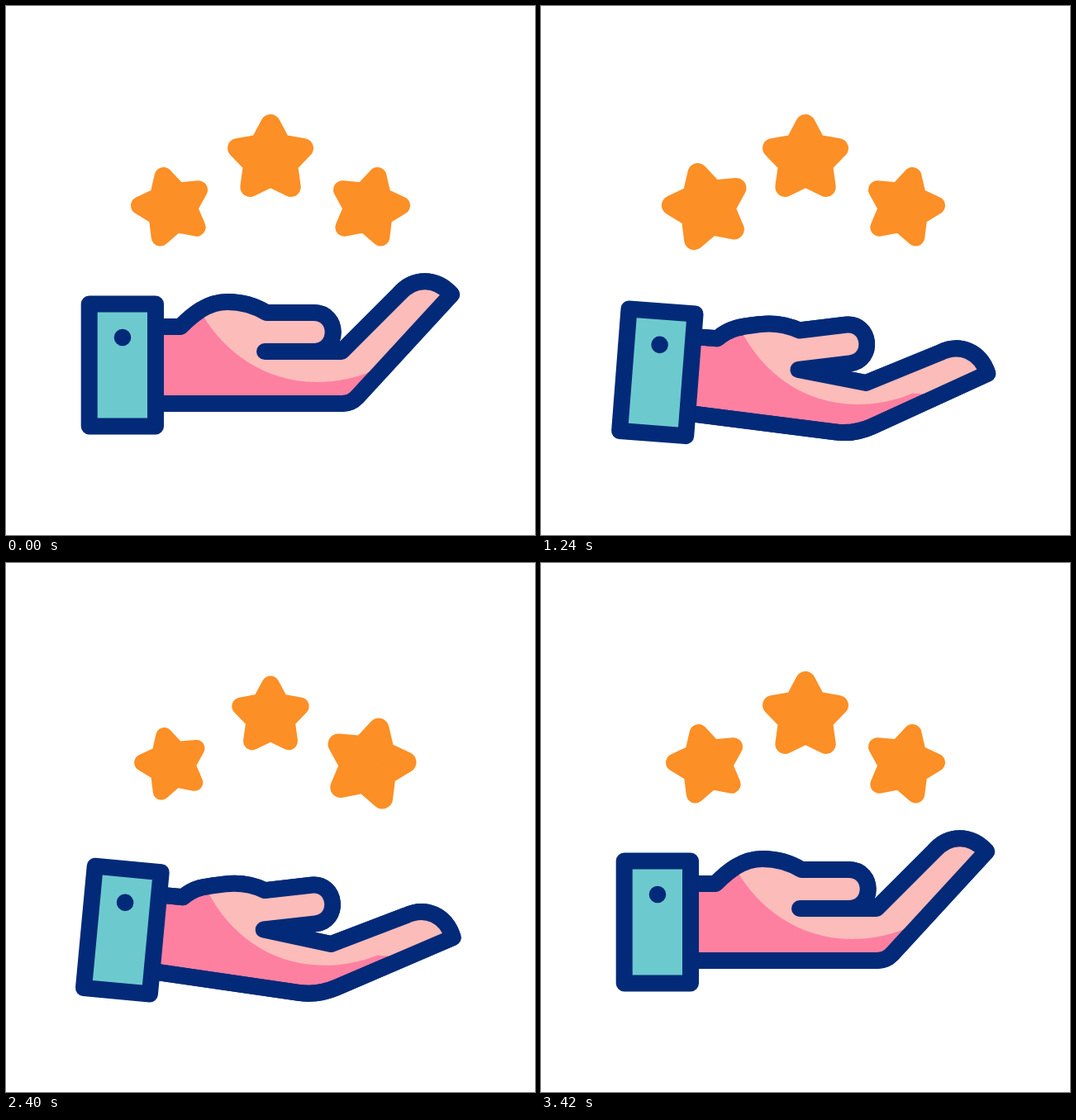
Recreate the animation shown at these times as an HTML page with a canvas. Size 640 by 640 pixels, loop 3600 ms.

```html
<!DOCTYPE html>
<html lang="en">
<head>
<meta charset="utf-8">
<title>Hand and stars</title>
<style>
html, body { margin: 0; width: 100%; height: 100%; overflow: hidden; background: #fff; }
canvas { display: block; width: 640px; height: 640px; }
</style>
</head>
<body>
<canvas id="stage" width="640" height="640"></canvas>
<script>
const ctx = document.getElementById('stage').getContext('2d');
const LOOP = 3600;
const NAVY = '#032a78', TEAL = '#6ccacf', PINK = '#fd80a1', SKIN = '#fbbcba', ORANGE = '#fc8f25';

// Joints, in the upright frame of the arm.
const CUFF = [141, 434.5], KNUCKLE = [372, 396], THUMB = [311, 394];

// Angles are in degrees; bend opens the fingers and reach foreshortens the hand.
const rest = { drop: 0, bend: 0, thumb: 0, reach: 1 };
const low = { drop: 11.5, bend: 20, thumb: -13, reach: .99 };
const high = { drop: -1.6, bend: 14, thumb: -4, reach: .968 };
const poses = [[200, rest], [1000, low], [1800, high], [2600, low], [3400, rest]];
const tilts = [[200, 0], [1000, 7.5], [1800, -7.4], [2600, 7.5], [3000, -8], [3400, 0]];

const rad = deg => deg * Math.PI / 180;
const mix = (a, b, k) => a + (b - a) * k;

// Finds the two keys around t and the sine-eased progress between them.
function span(keys, t) {
  const next = keys.findIndex(key => key[0] > t);
  if (next < 1) {
    const end = keys.at(next)[1];
    return [end, end, 0];
  }
  const [t0, a] = keys[next - 1], [t1, b] = keys[next];
  return [a, b, (1 - Math.cos(Math.PI * (t - t0) / (t1 - t0))) / 2];
}

// Returns a function that turns points about a pivot.
function turner([px, py], deg) {
  const c = Math.cos(rad(deg)), s = Math.sin(rad(deg));
  return (x, y) => [px + (x - px) * c - (y - py) * s, py + (x - px) * s + (y - py) * c];
}

function handPath(bend, thumb) {
  const f = turner(KNUCKLE, bend), t = turner(THUMB, thumb);
  const p = new Path2D();
  p.moveTo(183, 388);
  p.lineTo(211, 388);
  p.bezierCurveTo(225, 374, ...t(243, 358), ...t(268, 358));
  p.bezierCurveTo(...t(285, 358), ...t(300, 362), ...t(315, 371));
  p.lineTo(...t(372, 371));
  p.bezierCurveTo(...t(403.5, 371), ...t(403.5, 418), ...t(372, 418));
  p.lineTo(313, 418);
  p.lineTo(...f(406, 418));
  p.lineTo(...f(475, 349));
  p.bezierCurveTo(...f(493, 328), ...f(520, 328), ...f(539, 349));
  // The heel of the hand grows rounder as the fingers open.
  p.arcTo(...f(417.5, 481), 183, 481, 25 + bend * 3.2);
  p.lineTo(183, 481);
  return p;
}

const light = new Path2D(
  'M238 374C262 415 310 455 376 455C400 455 428 450 455 436H600V200H238Z');
const cuff = new Path2D('M100.7 360.5H181V508.5H100.7Z');
const star = new Path2D();
for (let i = 0; i < 10; i++) {
  const r = i % 2 ? 22 : 42, a = rad(i * 36);
  star.lineTo(r * Math.sin(a), -r * Math.cos(a));
}
star.closePath();

function paint(path, fill, stroke, width) {
  ctx.fillStyle = fill;
  ctx.strokeStyle = stroke;
  ctx.lineWidth = width;
  ctx.fill(path);
  ctx.stroke(path);
}

// All stars dip together, then swell one after another from left to right.
function pulse(i, t) {
  return mix(...span([
    [200, 1], [600, .865], [1000, 1], [1000 + 320 * i, 1],
    [1460 + 410 * i, 1.19], [2260 + 270 * i, .87], [2600 + 400 * i, 1]
  ], t));
}

function drawStar(i, t) {
  const side = i - 1;
  const k = pulse(i, t) * (side ? .92 : 1);
  ctx.save();
  ctx.translate(320 + side * 119.4, side ? 243.4 : 185);
  ctx.rotate(rad(side * 15));
  ctx.scale(k, k);
  paint(star, ORANGE, ORANGE, 24);
  ctx.restore();
}

function drawArm(t) {
  const [a, b, k] = span(poses, t);
  const at = name => mix(a[name], b[name], k);
  const [cx, cy] = CUFF;
  const hand = handPath(at('bend'), at('thumb'));

  ctx.save();
  ctx.translate(cx, cy + at('drop'));
  ctx.rotate(rad(mix(...span(tilts, t))));
  ctx.translate(-cx, -cy);

  ctx.save();
  ctx.translate(cx, 0);
  ctx.scale(at('reach'), 1);
  ctx.translate(-cx, 0);
  paint(hand, PINK, NAVY, 20);
  ctx.save();
  ctx.clip(hand);
  ctx.fillStyle = SKIN;
  ctx.fill(light);
  ctx.restore();
  ctx.stroke(hand);
  ctx.restore();

  paint(cuff, TEAL, NAVY, 20);
  ctx.beginPath();
  ctx.arc(cx, 401, 10.3, 0, 2 * Math.PI);
  ctx.fillStyle = NAVY;
  ctx.fill();
  ctx.restore();
}

const start = performance.now();
function frame(now) {
  const t = Math.max(0, now - start) % LOOP;
  ctx.fillStyle = '#fff';
  ctx.fillRect(0, 0, 640, 640);
  ctx.lineJoin = 'round';
  for (let i = 0; i < 3; i++) drawStar(i, t);
  drawArm(t);
  requestAnimationFrame(frame);
}
frame(start);
</script>
</body>
</html>
```
